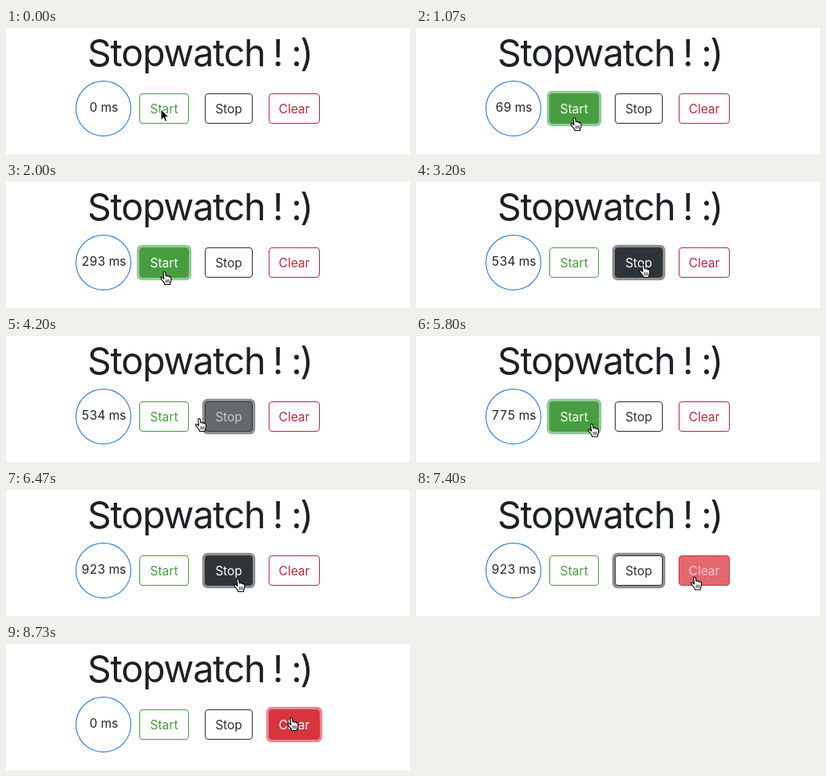
These frames come from a looping animation (506 px wide and 158 px high, 8790 ms). An HTML page:

```html
<!DOCTYPE html>
<html lang="en">
<head>
<meta charset="utf-8">
<title>Stopwatch</title>
<style>
  html, body { margin: 0; width: 100%; height: 100%; overflow: hidden; background: #fff; }
  svg { display: block; width: 506px; height: 158px; }
  text {
    font: 400 15.5px Inter, Roboto, sans-serif;
    font-optical-sizing: none;
    text-anchor: middle;
    fill: #212529;
  }
  #time { font-variant-numeric: tabular-nums; }
  .title text { font-size: 46.5px; font-weight: 420; letter-spacing: -1.2px; fill: #1d2024; }
  .title .smile { letter-spacing: -2.5px; }
</style>
</head>
<body>
<svg viewBox="0 0 506 158">
  <rect width="506" height="158" fill="#fff"/>
  <g class="title">
    <text x="213.2" y="48">Stopwatch</text>
    <text x="340" y="48">!</text>
    <text x="370" y="48" class="smile">:)</text>
  </g>
  <circle cx="122" cy="101" r="34.4" fill="none" stroke="#2f7ed8" stroke-width="1.15"/>
  <text id="time" x="122.5" y="105">0 ms</text>
  <g id="buttons"></g>
  <path id="arrow" d="M0 0V14.2L3.3 11.2L5.4 16L7.8 15L5.8 10.3H10.2Z"
        fill="#000" stroke="#fff" stroke-width="1.1"/>
  <g id="hand" stroke="#000" stroke-linejoin="round" stroke-linecap="round">
    <path fill="#fff" stroke-width="1.1" d="M4 1.7C3.8 .2 6.3 .1 6.6 1.6L7.3 6C7.5 4.9 9.4 5 9.6 6.4
      C10 5.4 11.6 5.7 11.8 7.1C12.2 6.3 13.8 6.6 13.8 8.3V11C13.8 13 12.5 14 12.4 16.5H5.8
      C5.8 14.5 4 13.2 3 11.8C2 10.4 .8 9.2 .9 8.3C1 7.3 2.4 7.2 3.4 8.2L4.8 9.6Z"/>
    <path fill="none" stroke-width=".8" d="M7.4 10.6V14M9.3 10.6V14M11.2 10.6V14"/>
  </g>
</svg>
<script>
const LOOP = 8790, TICK = 200 / 3, FADE = 150;
const NS = 'http://www.w3.org/2000/svg';
const $ = id => document.getElementById(id);

// on/off times alternate, starting with "on"
const buttons = [
  { label: 'Start', x: 167, w: 62, ink: [72, 157, 64], fill: [72, 157, 64], ring: '#93c99b',
    hover: [40, 2720, 4265, 5850], focus: [700, 2920, 4700, 6320] },
  { label: 'Stop', x: 249, w: 60, ink: [44, 48, 53], fill: [47, 52, 57], ring: '#8c8f93',
    hover: [2780, 4150, 5970, 7170], focus: [2920, 4700, 6320, 7970] },
  { label: 'Clear', x: 329, w: 64, ink: [184, 40, 60], fill: [216, 52, 61], ring: '#e78898',
    hover: [7300], focus: [7970] }
];

// pointer moves: start, end, target x, target y
const moves = [
  [0, 330, 193, 112],
  [2250, 2520, 194, 112.5],
  [2560, 2940, 279, 103],
  [3560, 3730, 276, 103],
  [3900, 4470, 203, 103],
  [5200, 5600, 203, 109.5],
  [5640, 6310, 285, 111],
  [6990, 7610, 365, 107.5],
  [8620, 8733, 352, 92]
];

const clamp = v => Math.max(0, Math.min(1, v));
const ease = v => { v = clamp(v); return v * v * (3 - 2 * v); };
const mix = (a, b, p) => a + (b - a) * p;
const rgb = (a, b, p) => `rgb(${a.map((v, i) => Math.round(mix(v, b[i], p)))})`;
const WHITE = [255, 255, 255];

function add(parent, tag, attrs) {
  const el = document.createElementNS(NS, tag);
  set(el, attrs);
  return parent.appendChild(el);
}

function set(el, attrs) {
  for (const k in attrs) el.setAttribute(k, attrs[k]);
}

for (const b of buttons) {
  const g = $('buttons');
  b.halo = add(g, 'rect', { x: b.x - 3.2, y: 78.8, width: b.w + 6.4, height: 44.4, rx: 6.5, fill: b.ring });
  b.box = add(g, 'rect', { x: b.x + .5, y: 82.5, width: b.w - 1, height: 37, rx: 3.5 });
  b.text = add(g, 'text', { x: b.x + b.w / 2, y: 107 });
  b.text.textContent = b.label;
}

function level(times, t) {
  let v = 0;
  times.forEach((at, i) => {
    if (t >= at) v = mix(v, i % 2 ? 0 : 1, ease((t - at) / FADE));
  });
  return v;
}

function pointer(t) {
  let x = 193, y = 101;
  for (const [from, to, tx, ty] of moves) {
    const p = ease((t - from) / (to - from));
    x = mix(x, tx, p);
    y = mix(y, ty, p);
  }
  return [x, y];
}

function count(t) {
  if (t >= 8050) return 0;
  if (t >= 4792) return Math.min(923, 534 + Math.floor((t - 4792) * .24));
  return Math.max(0, Math.min(534, Math.floor((t - 778) * .24)));
}

function draw(ms) {
  const t = Math.floor((ms % LOOP + 5) / TICK) * TICK;
  $('time').textContent = count(t) + ' ms';
  for (const b of buttons) {
    const h = level(b.hover, t);
    set(b.halo, { opacity: level(b.focus, t) });
    set(b.box, { fill: rgb(WHITE, b.fill, h), stroke: rgb(b.ink, b.fill, h) });
    b.text.style.fill = rgb(b.ink, WHITE, h);
  }
  const [x, y] = pointer(t), start = t < 60;
  set($('arrow'), { transform: 'translate(194 101.5)', opacity: start ? 1 : 0 });
  set($('hand'), { transform: `translate(${x.toFixed(2)} ${y.toFixed(2)})`, opacity: start ? 0 : 1 });
}

const begin = performance.now();
function frame() {
  draw(performance.now() - begin);
  requestAnimationFrame(frame);
}
frame();
</script>
</body>
</html>
```
